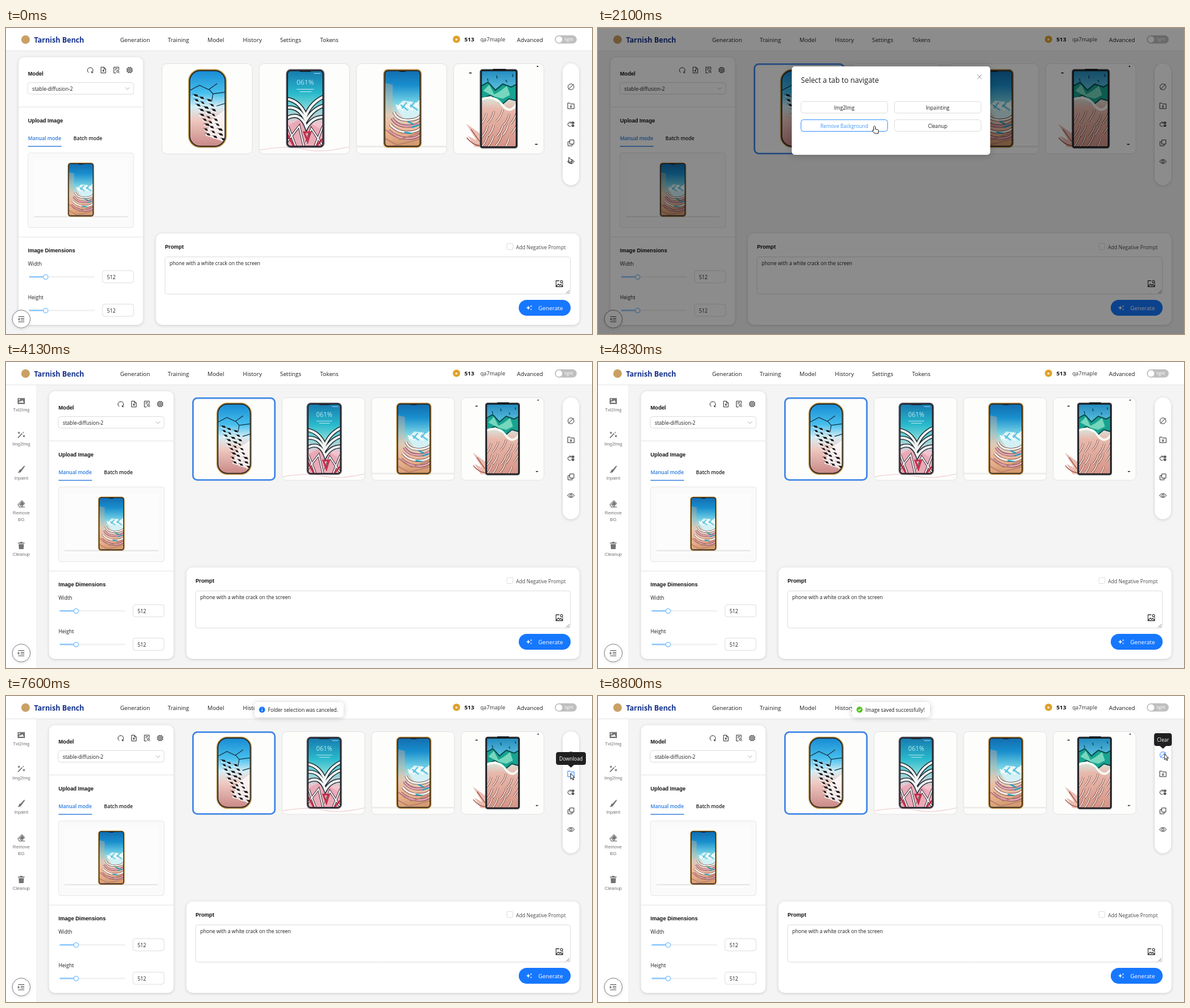
Write an HTML page with a canvas that moves like this. It is 960x502 px and loops after 8.83 s.

```html
<!DOCTYPE html>
<html lang="en">
<head>
<meta charset="utf-8">
<title>Image generation workspace</title>
<style>
html, body { margin: 0; width: 100%; height: 100%; overflow: hidden; background: #f4f4f4; }
canvas { display: block; width: 960px; height: 502px; }
</style>
</head>
<body>
<canvas id="stage" width="960" height="502"></canvas>
<script>
const c = document.getElementById('stage').getContext('2d');
const LOOP = 8830;
const UI = '"Open Sans", "Noto Sans", sans-serif';
const ARIAL = '"Liberation Sans", Arial, sans-serif';
const INK = '#1f1f1f', BLUE = '#1677ff', SKY = '#4096ff', LINE = '#dedede';

const clamp = v => Math.max(0, Math.min(1, v));
const ease = v => v * v * (3 - 2 * v);
const ramp = (t, from, to) => ease(clamp((t - from) / (to - from)));
const pulse = (t, on, off, fade = 100) => ramp(t, on, on + fade) * (1 - ramp(t, off, off + fade));
const rand = n => { const v = Math.sin(n * 78.233) * 43758.5453; return v - Math.floor(v); };

function box(x, y, w, h, r, fill, stroke, lw = 1) {
  c.beginPath();
  c.roundRect(x, y, w, h, r);
  if (fill) { c.fillStyle = fill; c.fill(); }
  if (stroke) { c.strokeStyle = stroke; c.lineWidth = lw; c.stroke(); }
}

function card(x, y, w, h, r, blur = 5, alpha = 0.16) {
  c.save();
  c.shadowColor = `rgba(0,0,0,${alpha})`;
  c.shadowBlur = blur;
  c.shadowOffsetY = 1;
  box(x, y, w, h, r, '#fff');
  c.restore();
}

function disc(x, y, r, fill, stroke, lw) { box(x - r, y - r, r * 2, r * 2, r, fill, stroke, lw); }

// The UI face runs wide, so its sizes are reduced slightly.
function text(s, x, y, size, color = INK, { weight = 400, font = UI, align = 'left' } = {}) {
  c.font = `${weight} ${font === UI ? size * 0.935 : size}px ${font}`;
  c.textAlign = align;
  c.fillStyle = color;
  c.fillText(s, x, y + size * 0.35);
}
const heading = (s, x, y) => text(s, x, y, 8.75, '#111', { weight: 700, font: ARIAL });

function path(d, color, lw, fill) {
  const p = new Path2D(d);
  c.lineWidth = lw;
  if (fill) { c.fillStyle = fill; c.fill(p); }
  if (color) { c.strokeStyle = color; c.stroke(p); }
}

function icon(d, x, y, size, color = '#222', lw = 1.9, fill) {
  c.save();
  c.translate(x - size / 2, y - size / 2);
  c.scale(size / 24, size / 24);
  path(d, color, lw, fill);
  c.restore();
}

const ICON = {
  reset: 'M7 21A9.5 9.5 0 1 1 17 21M17 21v-5M17 21h5',
  add: 'M4 2h10l6 6v14H4zM14 2v6h6M12 10v8M8 14h8',
  find: 'M11 22H3V2h17v9M7 7h9M7 11h4M13 16a3.5 3.5 0 1 0 7 0a3.5 3.5 0 1 0-7 0M19 19l3 3',
  chip: 'M5 5h14v14H5zM9 9h6v6H9zM9 1v4M15 1v4M9 19v4M15 19v4M1 9h4M1 15h4M19 9h4M19 15h4',
  clear: 'M2 12a10 10 0 1 0 20 0a10 10 0 1 0-20 0M21 3L3 21',
  download: 'M1 3h8l3 3h11v16H1zM12 9v9M8.5 14.5L12 18l3.5-3.5',
  again: 'M12 6H8a6.500 6.500 0 0 0 0 13h3M8 2l4 4-4 4M15 4h7v6h-7zM15 14h7v5h-7zM15 7h7M15 17h7',
  copy: 'M8 2h14v14H8zM8 8H2v14h14v-6',
  eye: 'M1 12C5 3 19 3 23 12C19 21 5 21 1 12zM8 12a4 4 0 1 0 8 0a4 4 0 1 0-8 0',
  picture: 'M12 3H2v18h20v-7M3 19l6-6 4 4 3-3 5 5M15 6a3.500 3.500 0 1 0 7 0a3.500 3.500 0 1 0-7 0M20 9l3 3',
  spark: 'M9 4l2 6 6 2-6 2-2 6-2-6-6-2 6-2zM19 2l1 3 3 1-3 1-1 3-1-3-3-1 3-1zM19 15l1 2 2 1-2 1-1 2-1-2-2-1 2-1z',
  fold: 'M2 4h20M10 10h12M10 15h12M2 21h20M6 9v7l-4-3.500z',
  unfold: 'M2 4h20M10 10h12M10 15h12M2 21h20M2 9v7l4-3.500z',
  close: 'M3 3l18 18M21 3L3 21'
};

const TOOLS = [['clear', 96.5], ['download', 127.5], ['again', 158], ['copy', 188.5], ['eye', 219]];

function device(x, y, w, h, r, stops, edge, paint) {
  const g = c.createLinearGradient(0, y, 0, y + h);
  stops.forEach(([p, color]) => g.addColorStop(p, color));
  c.save();
  box(x, y, w, h, r, g);
  c.clip();
  paint();
  c.restore();
  box(x, y, w, h, r, null, edge, 3);
  box(x + 1, y + 1, w - 2, h - 2, r - 1, null, '#17191f', 1.5);
}

function shatteredPhone() {
  const stops = [[0, '#1689d2'], [0.3, '#48c0ee'], [0.48, '#d5eef4'], [0.65, '#efc9c0'], [1, '#c98785']];
  device(45, 11, 60, 126, 18, stops, '#b28b3c', () => {
    path('M106 75L82 92L72 118L106 130z', null, 0, 'rgba(255,255,255,.75)');
    path('M45 45L62 36L77 43L91 33M78 43L84 50L106 47M84 50L82 62M90 70L106 65', '#173448', 1.3);
    for (let i = 0; i < 27; i++) {
      const row = Math.floor(i / 3);
      const x = 48 + (i % 3) * 11 + row * 2.6 + rand(i + 1) * 4, y = 50 + row * 8 + (i % 3) * 4;
      const l = 5 + rand(i + 9) * 5;
      path(`M${x} ${y}l${l} 1l2 4l-${l * 0.6} -1l-2 -3z`, null, 0, '#15171b');
      path(`M${x + 2} ${y + 4}l${l} 2`, '#fff', 1);
    }
  });
}

function bridgePhone() {
  path('M2 142Q50 134 75 141T148 137', '#eecbd0', 1.2);
  const stops = [[0, '#1678ae'], [0.3, '#29b9cc'], [0.5, '#82d9d8'], [0.7, '#f2c5cf'], [1, '#e893a6']];
  device(46, 11, 60, 126, 6, stops, '#57535c', () => {
    text('061%', 76, 31, 12, '#b9edf2', { align: 'center' });
    c.fillStyle = 'rgba(255,255,255,.7)';
    c.fillRect(62, 42, 28, 1);
    c.fillRect(67, 46, 19, 1);
    c.fillRect(90, 16, 11, 1);
    path('M46 102L71 90L106 111V138H46z', null, 0, '#e9aab7');
    const arches = 'M44 58Q67 61 77 86Q86 63 108 54M44 73Q66 69 77 94Q90 73 108 69M44 91Q68 77 78 105Q88 87 108 88';
    path(arches, '#192b36', 7);
    path(arches, '#f4f5f2', 4);
    const struts = 'M46 129L66 103L74 137M106 137L86 107L78 130M48 104L61 138M105 103L91 138';
    path(struts, '#362832', 4);
    path(struts, '#fff', 2);
    path('M47 117L58 137M94 136L104 124M74 113H84L80 128z', '#c32e49', 3);
    c.fillStyle = '#18242b';
    c.beginPath();
    c.roundRect(66, 10, 20, 4, 2);
    c.fill();
  });
}

function circuitPhone() {
  const stops = [[0, '#126bad'], [0.2, '#198fce'], [0.42, '#74d1e4'], [0.58, '#d9d9cf'], [0.78, '#efb699'], [1, '#cf9464']];
  device(46, 11, 60, 126, 6, stops, '#b88b43', () => {
    path('M46 32L60 35V137H46z', null, 0, 'rgba(231,177,139,.38)');
    path('M65 72L77 61L107 65V91L78 91z', null, 0, '#d3f1f5');
    for (let i = 0; i < 5; i++) {
      path(`M${68 + i * 7} ${75 - i}l8 -10M${65 + i * 8} 68l12 9`, i % 2 ? '#4dbddb' : '#fff', 2);
    }
    for (let i = 0; i < 4; i++) {
      const y = 80 + i * 10;
      const curve = `M${62 - i * 3} ${y}Q67 ${y + 14} 87 ${y + 13}T110 ${y - 2}`;
      path(curve, '#6c454c', 5);
      path(curve, i % 2 ? '#e7a4b3' : '#f7f5eb', 3.2);
    }
    path('M48 109L72 125L106 113M47 123L67 134L106 124', '#b98071', 2);
    path('M84 95l10 5M91 105l12-4M79 113l12 2', '#249fbe', 2.5);
    c.fillStyle = '#17212c';
    c.beginPath();
    c.roundRect(70, 10, 12, 4, 2);
    c.fill();
  });
}

function mountainPhone() {
  path('M45 116L21 99L38 126L24 119L35 137L46 138z', null, 0, '#eabdb1');
  path('M22 122Q32 134 43 135M29 108L43 128', '#95483e', 1.3);
  const stops = [[0, '#2189bd'], [0.24, '#59bdde'], [0.35, '#d7e8df'], [0.5, '#e8b9ac'], [1, '#d59386']];
  device(45, 11, 59, 127, 3, stops, '#34373b', () => {
    path('M44 38L57 31L69 44L81 34L95 39L106 33V62L91 58L79 68L62 52L44 59z', '#064c4c', 2, '#17a391');
    path('M49 45L59 35L67 51L76 46L88 37L93 52L81 58L66 54z', null, 0, '#75d7bd');
    path('M44 60Q66 50 80 68T106 63', '#f7faf4', 4);
    for (let i = 0; i < 14; i++) {
      const x = 48 + (i % 5) * 12 + rand(i + 30) * 5, y = 76 + Math.floor(i / 5) * 20 + rand(i + 50) * 8;
      const slash = `M${x + 5} ${y}Q${x + 3} ${y + 10} ${x - 5} ${y + 19}`;
      path(slash, '#744039', 3.2);
      path(slash, '#fff0e9', 1.7);
    }
    path('M56 25l1 4M71 20l1 5M86 27l2 4M97 18l1 4', '#123f56', 1.5);
  });
  c.fillStyle = '#17191b';
  c.fillRect(65, 9, 21, 3);
  c.fillRect(26, 15, 4, 1.5);
  c.fillRect(134, 132, 4, 1.5);
  c.fillRect(137, 4, 2, 2);
}

const PHONES = [shatteredPhone, bridgePhone, circuitPhone, mountainPhone];

function gallery(shift, selected) {
  const left = 255 + shift, w = (882 - left - 30) / 4;
  PHONES.forEach((paint, i) => {
    const x = left + i * (w + 10);
    c.save();
    c.translate(x, 58);
    c.scale(w / 149.25, w / 149.25);
    box(0.5, 0.5, 148, 148, 8, '#fdfdfc', '#e1e1e1');
    if (i === 2) {
      c.fillStyle = '#eeecea';
      c.fillRect(1, 135, 147, 3);
    }
    paint();
    c.restore();
    if (!i && selected) box(x + 1.3, 59.3, w - 2.6, w - 2.6, 7, null, '#3f86e8', 2.6);
  });
}

function header() {
  c.fillStyle = '#fff';
  c.fillRect(0, 0, 960, 37);
  c.fillStyle = '#e5e5e5';
  c.fillRect(0, 37, 960, 1);
  disc(32, 19, 7, '#c9a064');
  text('Tarnish Bench', 46, 19.5, 12.5, '#14328c', { weight: 700 });
  [['Generation', 187], ['Training', 265], ['Model', 330], ['History', 388], ['Settings', 449], ['Tokens', 514.5]]
    .forEach(([s, x]) => text(s, x, 19, 10));
  disc(738, 18.5, 6, '#dfa12b');
  text('★', 738, 18.5, 6.5, '#fff', { align: 'center', font: '"DejaVu Sans", sans-serif' });
  text('513', 751, 18.5, 10, '#111', { weight: 700 });
  text('qa7maple', 777, 18.5, 9.4, '#333');
  text('Advanced', 837, 19, 10);
  box(899, 12, 36, 13.500, 7, '#bfbfbf');
  disc(906, 18.7, 5.3, '#fff');
  text('light', 915, 18.4, 7.5, '#fff');
}

function field(label, y) {
  text(label, 36, y, 8.75);
  c.fillStyle = '#f1f1f1';
  c.fillRect(38, y + 20.5, 107, 2.5);
  c.fillStyle = '#91caff';
  c.fillRect(38, y + 20.5, 27, 2.5);
  disc(65, y + 22, 3.8, '#fff', '#91caff', 1.5);
  box(158, y + 11.5, 51, 20, 4, '#fff', LINE);
  text('512', 165.5, y + 22, 8.75);
}

function settings(shift) {
  c.save();
  c.translate(shift, 0);
  card(20.5, 48, 204, 439, 9);
  heading('Model', 36, 74.5);
  ['reset', 'add', 'find', 'chip'].forEach((name, i) => icon(ICON[name], 138 + i * 21.5, 69, 11.5));
  box(35.5, 89.5, 173.500, 19, 4, '#fff', LINE);
  text('stable-diffusion-2', 43, 99.5, 8.75);
  path('M195.500 97.500l3.500 3.500l3.500 -3.500', '#b5b5b5', 1);
  c.fillStyle = '#e4e4e4';
  c.fillRect(20.5, 129, 204, 1);
  c.fillRect(20.5, 342.5, 204, 1);
  heading('Upload Image', 36, 151.5);
  text('Manual mode', 36, 181, 8.75, '#2878dc', { weight: 600 });
  text('Batch mode', 110.5, 181, 8.75, INK, { weight: 600 });
  c.fillStyle = '#2878dc';
  c.fillRect(36, 193.5, 55, 1.3);
  box(36, 205, 173, 122.5, 4, '#fafafa', '#e6e6e6');
  c.fillStyle = '#fcfcfc';
  c.fillRect(46, 216, 153, 99);
  c.fillStyle = '#e6e4e3';
  c.fillRect(46, 308.5, 153, 2);
  c.save();
  c.translate(70.2, 214.3);
  c.scale(0.69, 0.69);
  circuitPhone();
  c.restore();
  heading('Image Dimensions', 36, 365);
  field('Width', 386.5);
  field('Height', 441.5);
  c.restore();
}

function promptPanel(shift) {
  const x = 245.5 + shift;
  card(x, 337, 939.5 - x, 150, 10);
  heading('Prompt', x + 15, 358.5);
  box(820.5, 353.5, 10, 10, 2, '#fff', LINE);
  text('Add Negative Prompt', 835.5, 359.5, 8.75, '#4b4b4b');
  box(x + 15, 375.5, 924.5 - x - 15, 61, 4, '#fff', LINE);
  text('phone with a white crack on the screen', x + 22.5, 386, 8.75);
  icon(ICON.picture, 906.5, 419.5, 13);
  path('M918 435.500l5-5M921.500 435.500l1.500-1.500', '#666', 1);
  box(840, 446, 85, 26, 13, BLUE);
  icon(ICON.spark, 857, 459, 11, null, 0, '#fff');
  text('Generate', 872, 459.5, 10, '#fff');
}

function toolbar(cursor, t) {
  card(912, 58, 27, 200, 13.5);
  TOOLS.forEach(([name, y]) => {
    const hover = cursor && t > 100 && Math.hypot(cursor.x - 925.5, cursor.y - y) < 10;
    icon(ICON[name], 925.5, y, 11.5, hover ? BLUE : '#222');
  });
}

function sidebar(shift) {
  if (shift > 0) {
    c.save();
    c.translate(shift - 50, 0);
    c.fillStyle = '#fff';
    c.fillRect(0, 38, 50, 464);
    c.fillStyle = '#ececec';
    c.fillRect(50, 38, 1, 464);
    const gray = '#747474';
    icon('M1 3h22v18H1zM4 17h16l-5-8-4 5-3-2zM4 6v3h4V6z', 25, 64, 13, null, 0, gray);
    path('M4 18L15 7M16 6l2-2', null, 0);
    icon('M2 20L15 7M17 5l2-2M5 2v6M2 5h6M20 12v6M17 15h6', 25, 120, 13, gray, 3);
    icon('M10 13L21 1l2 2L14 16zM9 13q5 1 4 5q-3 6-12 4q4-2 4-5q0-4 4-4z', 25, 176, 13, null, 0, gray);
    icon('M2 14L14 2l8 8-10 11H6zM6 12l6 6M12 21h11', 25, 233, 13, gray, 2);
    icon('M8 12l6-8 6 6-6 7z', 25, 233, 13, null, 0, gray);
    icon('M2 3h6l1-2h6l1 2h6v3H2zM4 8h16l-1 15H5z', 25, 301, 13, null, 0, gray);
    [['Txt2Img', 78], ['Img2Img', 134.5], ['Inpaint', 190.5], ['Remove', 247], ['BG', 258.5], ['Cleanup', 315]]
      .forEach(([s, y]) => text(s, 25, y, 7.5, gray, { font: ARIAL, align: 'center' }));
    c.restore();
  }
  card(10, 463, 30, 30, 15, 5, 0.12);
  disc(25, 477.5, 14.7, '#fff', '#666', 0.8);
  icon(shift > 0 ? ICON.unfold : ICON.fold, 25, 477.5, 12, '#444');
}

const CHOICES = [['Img2Img', 332.5, 120.5], ['Inpainting', 485.5, 120.5], ['Remove Background', 332.5, 150.5], ['Cleanup', 485.5, 150.5]];

function dialog(alpha, cursor) {
  if (!alpha) return;
  c.save();
  c.globalAlpha = alpha;
  c.fillStyle = 'rgba(0,0,0,.45)';
  c.fillRect(0, 0, 960, 502);
  const zoom = 0.8 + 0.2 * alpha;
  c.translate(480, 135);
  c.scale(zoom, zoom);
  c.translate(-480, -135);
  card(317.5, 63, 325, 145, 5, 12, 0.2);
  text('Select a tab to navigate', 332.5, 86, 12.7, INK, { weight: 500 });
  icon(ICON.close, 625, 80, 9.5, '#777');
  CHOICES.forEach(([s, x, y]) => {
    const hot = cursor && cursor.x > x && cursor.x < x + 142 && cursor.y > y && cursor.y < y + 19;
    box(x, y, 142, 19, 4, '#fff', hot ? SKY : LINE);
    text(s, x + 71, y + 10.3, 8.75, hot ? SKY : INK, { align: 'center' });
  });
  c.restore();
}

function tooltip(label, y, w, alpha) {
  if (!alpha) return;
  c.save();
  c.globalAlpha = alpha;
  box(925.5 - w / 2, y, w, 21, 4, '#202020');
  path(`M920.500 ${y + 21}h10l-5 4.500z`, null, 0, '#202020');
  text(label, 925.5, y + 10.7, 8.75, '#fff', { align: 'center' });
  c.restore();
}

function toast(label, x, w, color, mark, enter, alpha) {
  if (!alpha) return;
  c.save();
  c.globalAlpha = alpha;
  c.translate(0, (enter - 1) * 30);
  card(x, 10, w, 25, 5, 10, 0.2);
  disc(x + 12.5, 22.5, 5, color);
  icon(mark, x + 12.5, 22.5, 10, '#fff', 2.6);
  text(label, x + 22, 23, 8.75);
  c.restore();
}

const ROUTE = [
  [0, 922, 212], [80, 922, 212], [400, 345, 140, 1], [520, 345, 140, 1], [850, 932, 219, 1], [1080, 932, 219, 1],
  [1250, 929, 190, 1], [1450, 929, 190, 1], [1900, 453, 161, 1], [2200, 453, 161, 1], [2450, 625, 80, 1],
  [2580, 625, 80, 1], [2950, 25, 478, 1], [3150, 25, 478, 1], [3500, 923, 132], [4000, 923, 132],
  [7370, 925, 127], [7900, 925, 127], [8060, 928, 95], [LOOP, 928, 95]
];

function cursorAt(t) {
  if (t > 4000 && t < 7370) return null;
  const i = Math.max(1, ROUTE.findIndex(p => p[0] > t));
  const a = ROUTE[i - 1], b = ROUTE[i], k = ramp(t, a[0], b[0]);
  return { x: a[1] + (b[1] - a[1]) * k, y: a[2] + (b[2] - a[2]) * k, hand: k > 0.85 ? b[3] : a[3] && b[3] };
}

function drawCursor(p) {
  if (!p) return;
  c.save();
  c.translate(p.x, p.y);
  const shape = p.hand
    ? 'M0 0C1 0 1.500 .6 1.500 1.500V5l4 .9q1.300 .4 1.100 1.800L6 12H.2L-3.500 7.800C-4 6.600-2.700 6-1.800 6.800L-1.400 7.200V1.500C-1.400 .6-1 0 0 0z'
    : 'M0 0V9.500l2.200-2.100 1.500 3.400 1.500-.7-1.500-3.300h3z';
  path(shape, '#222', 1, '#fff');
  c.restore();
}

function draw(t) {
  const cursor = cursorAt(t), shift = 50 * ramp(t, 3050, 3250);
  c.fillStyle = '#f4f4f4';
  c.fillRect(0, 0, 960, 502);
  settings(shift);
  gallery(shift, t >= 460);
  promptPanel(shift);
  toolbar(cursor, t);
  sidebar(shift);
  header();
  dialog(pulse(t, 1420, 2530, 170), cursor);
  tooltip('Download', 92, 49, Math.max(pulse(t, 3480, 3960), pulse(t, 7390, 7940)));
  tooltip('Clear', 61, 29, ramp(t, 8030, 8130));
  toast('Folder selection was canceled.', 407, 146, BLUE, 'M12 10v8M12 5v2', ramp(t, 7390, 7560), pulse(t, 7390, 7880, 150));
  toast('Image saved successfully!', 416, 128, '#52c41a', 'M6 12l4 4 8-8', ramp(t, 7970, 8110), ramp(t, 7970, 8110));
  drawCursor(cursor);
}

function tick() {
  draw(performance.now() % LOOP);
  requestAnimationFrame(tick);
}
tick();
</script>
</body>
</html>
```
